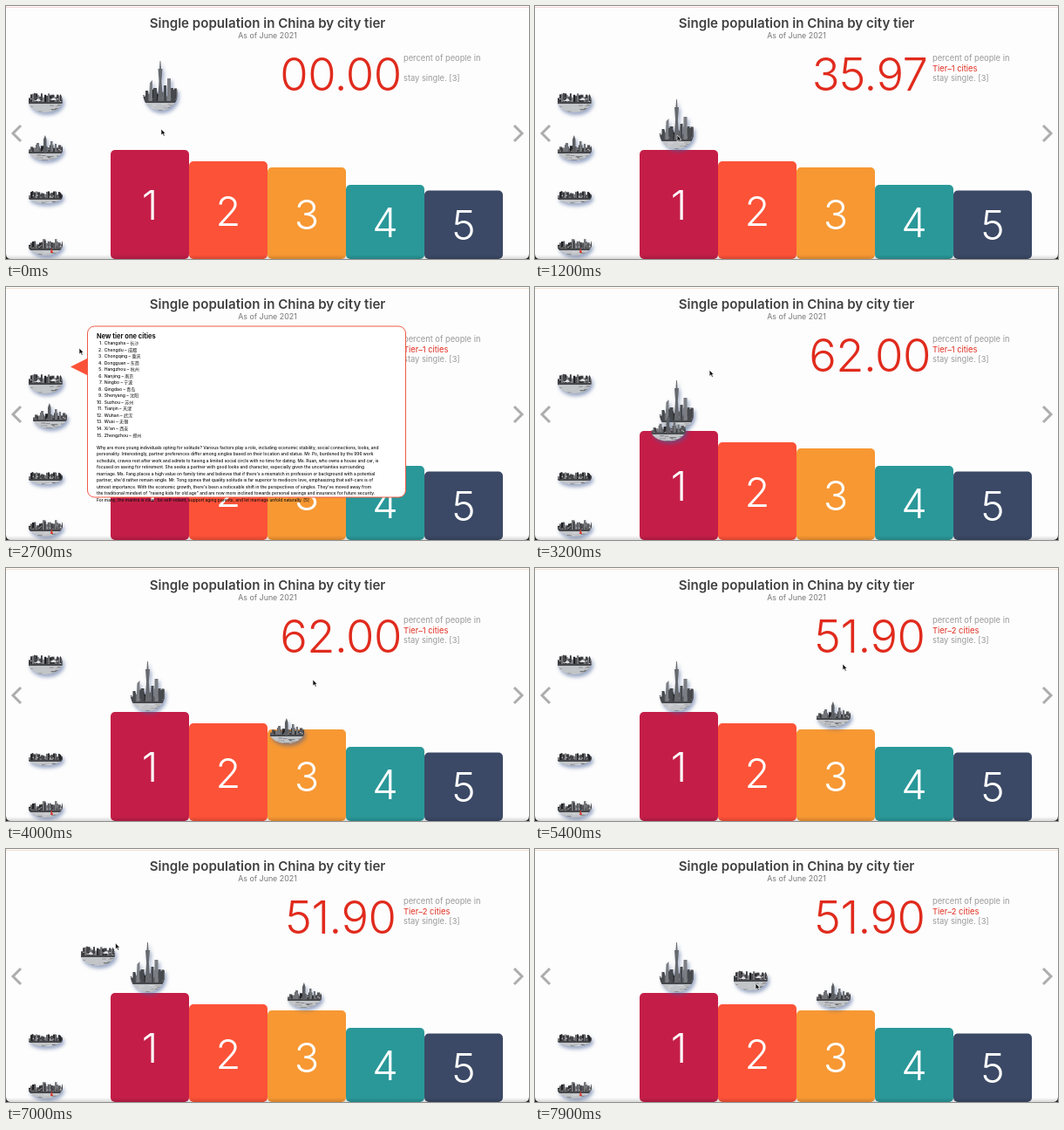
Animation, 600 px wide and 290 px high, one loop 8 s. Source, as an HTML page:

```html
<!DOCTYPE html>
<html lang="en">
<head>
<meta charset="utf-8">
<title>Single population by city tier</title>
<style>
  html, body { margin: 0; width: 100%; height: 100%; overflow: hidden; background: #fdfdfd; }
  svg { display: block; width: 600px; height: 290px; font-family: Inter, "Noto Sans CJK SC", "Noto Sans CJK", sans-serif; }
  .picture { filter: drop-shadow(2px 3px 2px rgba(70, 95, 150, .55)); }
  .chevron { fill: none; stroke: #adadad; stroke-width: 3; }
</style>
</head>
<body>
<svg id="stage" viewBox="0 0 600 290" xmlns="http://www.w3.org/2000/svg">
  <defs>
    <linearGradient id="dusk" x1="0" y1="0" x2="0" y2="1">
      <stop offset="0" stop-color="#000" stop-opacity="0"/>
      <stop offset="1" stop-color="#000" stop-opacity=".15"/>
    </linearGradient>
  </defs>
  <rect width="600" height="290" fill="#fdfdfd"/>
  <rect id="topLine" y="1" width="600" height="1"/>
  <text x="300" y="25" text-anchor="middle" font-size="15.1" font-weight="600" fill="#404040">Single population in China by city tier</text>
  <text x="300" y="37" text-anchor="middle" font-size="8.9" fill="#777">As of June 2021</text>
  <text id="number" x="384" y="96.5" text-anchor="middle" font-size="52.5" font-weight="300" letter-spacing="-.5" fill="#e02b1d"></text>
  <g font-size="9.3" fill="#999">
    <text x="456" y="63">percent of people in</text>
    <text id="tier" x="456" y="74.5" fill="#e02b1d"></text>
    <text x="456" y="86">stay single. [3]</text>
  </g>
  <path class="chevron" d="M17 137 L8 146 L17 155"/>
  <path class="chevron" d="M583 137 L592 146 L583 155"/>
  <g id="bars"></g>
  <g id="backPictures"></g>
  <g id="popup">
    <path d="M74 91.5 L93 82 V101 Z" fill="#fc5238"/>
    <rect x="93.5" y="45" width="365" height="196" rx="8" fill="#fff" stroke="#ee5a45"/>
    <text x="104" y="59.3" font-size="7.5" font-weight="700" fill="#111">New tier one cities</text>
    <g id="cities" font-size="5.05" font-weight="500" fill="#111"></g>
    <g id="essay" font-size="4.89" font-weight="500" fill="#111"></g>
  </g>
  <g id="frontPictures"></g>
  <rect y="285" width="600" height="5" fill="url(#dusk)"/>
  <path d="M0 284 Q0 290 6 290 H0 Z M600 284 Q600 290 594 290 H600 Z" fill="#222"/>
  <path id="cursor" d="M0 0 V7 L1.7 5.6 L2.9 8.2 L4.2 7.6 L3 5.1 H5 Z" fill="#111" stroke="#fff" stroke-width=".6"/>
</svg>
<script>
const LOOP = 8000;
const $ = id => document.getElementById(id);

function add(parent, name, attrs, text) {
  const node = document.createElementNS("http://www.w3.org/2000/svg", name);
  for (const key in attrs) node.setAttribute(key, attrs[key]);
  if (text) node.textContent = text;
  parent.appendChild(node);
  return node;
}

// Bars
[[165, 245, "#c41e48"], [178, 251.5, "#fc5238"], [185, 255.5, "#f79833"], [205, 265, "#2a9899"], [211.5, 268, "#3b4966"]]
  .forEach(([top, baseline, fill], i) => {
    const x = 120 + i * 90;
    add($("bars"), "rect", { x, y: top, width: 90, height: 290 - top, rx: 5, fill });
    add($("bars"), "text", { x: x + 45, y: baseline, "text-anchor": "middle", "font-size": 47, "font-weight": 300, fill: "#fff" }, String(i + 1));
  });

// Popup text
["Changsha – 长沙", "Chengdu – 成都", "Chongqing – 重庆", "Dongguan – 东莞", "Hangzhou – 杭州",
  "Nanjing – 南京", "Ningbo – 宁波", "Qingdao – 青岛", "Shenyang – 沈阳", "Suzhou – 苏州",
  "Tianjin – 天津", "Wuhan – 武汉", "Wuxi – 无锡", "Xi'an – 西安", "Zhengzhou – 郑州"]
  .forEach((city, i) => {
    const y = 66.1 + i * 7.53;
    add($("cities"), "text", { x: 110.7, y, "text-anchor": "end" }, i + 1 + ".");
    add($("cities"), "text", { x: 112.7, y }, city);
  });

`Why are more young individuals opting for solitude? Various factors play a role, including economic stability, social connections, looks, and
personality. Interestingly, partner preferences differ among singles based on their location and status. Mr. Po, burdened by the 996 work
schedule, craves rest after work and admits to having a limited social circle with no time for dating. Ms. Ruan, who owns a house and car, is
focused on saving for retirement. She seeks a partner with good looks and character, especially given the uncertainties surrounding
marriage. Ms. Fang places a high value on family time and believes that if there's a mismatch in profession or background with a potential
partner, she'd rather remain single. Mr. Tong opines that quality solitude is far superior to mediocre love, emphasizing that self-care is of
utmost importance. With the economic growth, there's been a noticeable shift in the perspectives of singles. They've moved away from
the traditional mindset of "raising kids for old age" and are now more inclined towards personal savings and insurance for future security.
For many, the mantra is clear: be self-reliant, support aging parents, and let marriage unfold naturally. [5]`
  .split("\n").forEach((line, i) => add($("essay"), "text", { x: 104, y: 185.8 + i * 7.5 }, line));

// City pictures: grey skyline over water, cropped by an ellipse
function randomFrom(seed) {
  return () => (seed = (seed * 16807) % 2147483647) / 2147483647;
}

function picture(layer, seed, { x, y, crop: [cx, cy, rx, ry], shore, rise, landmarks = [] }) {
  const random = randomFrom(seed);
  const grey = (low, span) => {
    const v = Math.round(low + random() * span);
    return `rgb(${v},${v},${v + 3})`;
  };
  const clip = add(document.querySelector("defs"), "clipPath", { id: "crop" + seed });
  add(clip, "ellipse", { cx, cy, rx, ry });
  const outer = add($(layer), "g", { class: "picture" });
  const g = add(outer, "g", { "clip-path": `url(#crop${seed})` });
  const bottom = cy + ry;
  add(g, "rect", { y: shore, width: 40, height: bottom - shore, fill: "#c2c5c8" });
  for (let i = 0; i < 20; i++) {
    const h = rise * (.4 + random() * .6);
    add(g, "rect", { x: i * 2, y: shore - h, width: 1.5 + random() * 2, height: h + 1, fill: grey(30, 100) });
  }
  for (let i = 0; i < 30; i++)
    add(g, "rect", { x: random() * 38, y: shore - rise * .5 + random() * rise * .5, width: 1.5, height: 1, fill: grey(30, 200) });
  add(g, "rect", { y: shore - 1, width: 40, height: 2, fill: "#45474a" });
  for (let i = 0; i < 14; i++)
    add(g, "rect", { x: random() * 34, y: shore + 2 + random() * (bottom - shore - 2), width: 3 + random() * 6, height: .8, fill: grey(90, 130) });
  landmarks.forEach(([d, fill]) => add(outer, "path", { d, fill }));
  return (dx, dy) => outer.setAttribute("transform", `translate(${x + dx} ${y + dy})`);
}

const moveTower = picture("backPictures", 11, {
  x: 157, y: 63, crop: [20, 37, 20, 20], shore: 47, rise: 16,
  landmarks: [
    ["M19.6 0 H20.4 L21 9 H19 Z M17.5 9 H22.5 L21.4 23 L23 46 H17 L18.6 23 Z", "#66696d"],
    ["M8 25 L11 22 V46 H7 Z M28 20 H32 V46 H28 Z", "#7b7e82"],
    ["M12 31 H16 V47 H12 Z M24 28 H27 V47 H24 Z M33 33 H37 V46 H33 Z M3 34 H6 V46 H3 Z", "#46494d"]
  ]
});
picture("backPictures", 37, { x: 26, y: 211, crop: [19, 7, 20, 8.5], shore: 10, rise: 10 })(0, 0);
picture("backPictures", 53, {
  x: 26, y: 265, crop: [19, 8, 20, 13], shore: 14, rise: 13,
  landmarks: [["M26 12 L28 18 H25 Z", "#d8362f"]]
})(0, 0);
const moveSkyline = picture("frontPictures", 71, {
  x: 26, y: 148, crop: [19, 16, 20, 13], shore: 20, rise: 9,
  landmarks: [["M18.9 0 L20.5 5 V20 H17 V5 Z", "#5b5e62"], ["M9 9 H12 V19 H9 Z M25 7 H27.5 V19 H25 Z M30 10 H32 V19 H30 Z", "#707377"]]
});
const movePark = picture("frontPictures", 97, {
  x: 26, y: 97, crop: [19, 11, 20, 14], shore: 14, rise: 14,
  landmarks: [["M8 12 Q11 6 14 12 Z M25 11 Q29 5 32 11 Z", "#dcddde"]]
});

// Motion
const smooth = p => p * p * (3 - 2 * p);

function along(keys, t) {
  const next = keys.findIndex(key => key[0] > t);
  if (next === 0) return keys[0].slice(1);
  if (next < 0) return keys[keys.length - 1].slice(1);
  const [t0, x0, y0] = keys[next - 1], [t1, x1, y1] = keys[next];
  const p = smooth((t - t0) / (t1 - t0));
  return [x0 + (x1 - x0) * p, y0 + (y1 - y0) * p];
}

function count(t, start, from, to) {
  const p = Math.min(1, Math.max(0, (t - start) / 800));
  return from + (to - from) * (1 - (1 - p) ** 3);
}

const cursorPath = [[0, 178, 141], [900, 163, 148], [2120, 163, 148], [2400, 47, 158], [2700, 84, 70],
  [3800, 352, 128], [4050, 352, 128], [4500, 353, 110], [5450, 353, 110], [6000, 50, 106],
  [6500, 68, 87], [7850, 253, 154]];
const towerPath = [[50, 0, 0], [950, -14.5, 44]];
const skylinePath = [[2400, 0, 0], [2700, 5, -15], [3900, 277, 24], [4050, 277, 24], [4500, 297, 5]];
const parkPath = [[6520, 0, 0], [7850, 202, 40]];
const within = (t, a, b) => t >= a && t < b;

function render(t) {
  moveTower(...along(towerPath, t));
  moveSkyline(...along(skylinePath, t));
  movePark(...along(parkPath, t));
  $("cursor").setAttribute("transform", `translate(${along(cursorPath, t)})`);
  const value = t < 4600 ? count(t, 1000, 0, 62) : count(t, 4600, 62, 51.9);
  $("number").textContent = value.toFixed(2).padStart(5, "0");
  $("tier").textContent = t < 1000 ? "" : t < 4600 ? "Tier–1 cities" : "Tier–2 cities";
  $("popup").style.display = within(t, 2600, 3100) || within(t, 6000, 6900) ? "" : "none";
  $("topLine").setAttribute("fill", t < 2400 ? "#f5d6dc" : "#f3decf");
}

const began = performance.now();
function tick() {
  render((performance.now() - began) % LOOP);
  requestAnimationFrame(tick);
}
tick();
</script>
</body>
</html>
```
